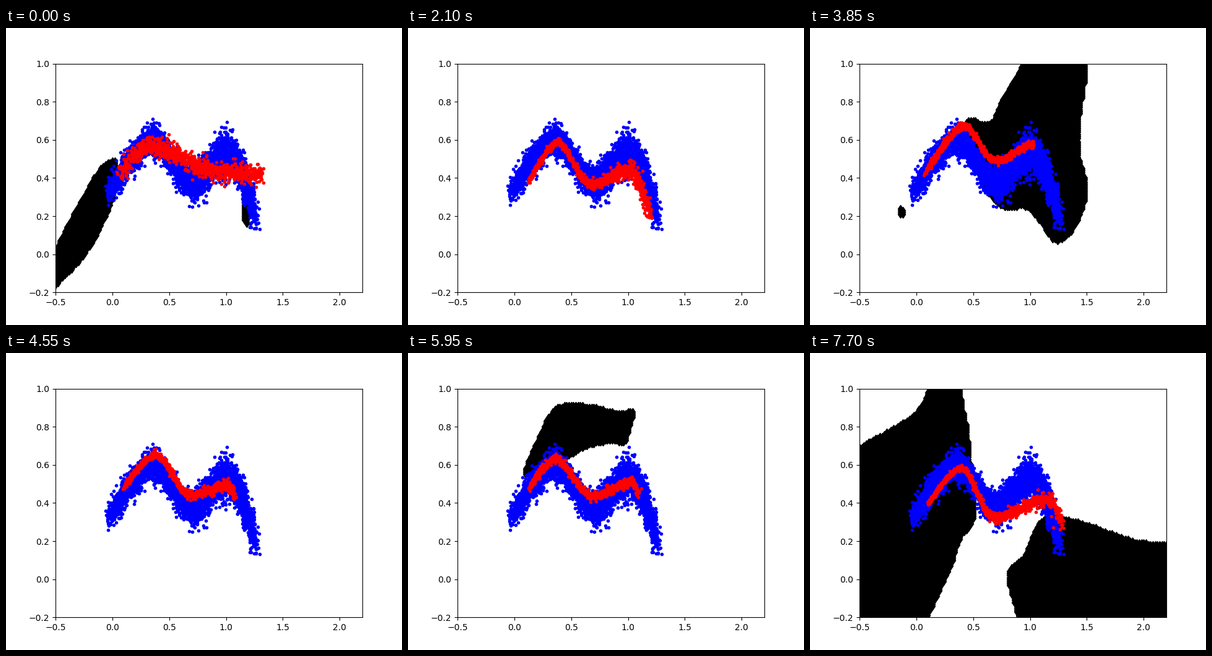
A matplotlib script that plays this animation: 640x480 px, repeating every 8000 ms.

```python
import numpy as np
import matplotlib.pyplot as plt
from matplotlib.animation import FuncAnimation
from matplotlib.path import Path

TICK, HOLD, FRAMES = 50, 7, 160      # each step stays 7 ticks of 50 ms
STEPS = 23
SCALE = np.array([183.7, 308.0])     # pixels per data unit

# Dark decision regions: a few points on each smooth, closed outline
START = [[(-.75, -.3), (-.5, .04), (-.26, .31), (-.1, .46), (.04, .495),
          (.03, .33), (-.08, .155), (-.255, -.02), (-.49, -.165)],
         [(1.14, .35), (1.22, .28), (1.19, .145), (1.14, .2)]]
SLIVER = [[(.44, .57), (.51, .59), (.525, .48), (.52, .39), (.46, .43)]]
DROP = [[(.42, .48), (.52, .385), (.56, .4), (.47, .5)],
        [(1.08, .33), (.97, .197), (.905, .09), (1.0, .03), (1.18, .018),
         (1.35, .09), (1.487, .213), (1.47, .33), (1.32, .377), (1.18, .37)]]
TOWER = [[(.93, 1.02), (1.0, 1.3), (1.45, 1.3), (1.51, 1.02), (1.43, .6),
          (1.505, .34), (1.4, .14), (1.226, .062), (1.07, .174), (.96, .242),
          (.75, .247), (.57, .37), (.43, .62), (.46, .715), (.64, .69),
          (.75, .82)],
         [(-.17, .22), (-.135, .25), (-.1, .22), (-.135, .195)]]
HOOD = [[(-.135, .48), (-.06, .64), (.09, .735), (.2, .82), (.25, .88),
         (.4, .907), (.48, .8), (.465, .62), (.35, .51), (.15, .42),
         (-.04, .34)]]
WALL = [[(.46, 1.02), (.6, 1.3), (1.9, 1.3), (1.78, 1.02), (1.55, .538),
         (1.405, .294), (1.2, .17), (1.0, .262), (.8, .254), (.6, .35),
         (.4, .55), (.295, .73), (.35, .88)]]
SPLIT = [[(-.8, .55), (-.5, .7), (-.17, .81), (.03, .908), (.15, 1.06),
          (.36, 1.06), (.42, .91), (.475, .7), (.515, .33), (.4, .22),
          (.3, .05), (.09, -.22), (-.12, -.5), (-.8, -.5)],
         [(.8, .03), (.94, .13), (1.106, .32), (1.4, .31), (1.9, .209),
          (2.4, .11), (2.5, -.5), (1.0, -.5), (.87, -.18)]]

# Step, region, spread at both ends, and start, crest, dip, crest, end
KEYS = [
    (0, START, (.022, .018),
     [(.06, .42), (.31, .57), (.95, .43), (1.05, .425), (1.32, .42)]),
    (4, SLIVER, (.006, .022),
     [(.14, .41), (.37, .59), (.66, .355), (1.0, .44), (1.22, .21)]),
    (9, DROP, (.006, .02),
     [(.1, .335), (.36, .55), (.69, .345), (1.0, .435), (1.17, .22)]),
    (11, TOWER, (.007, .007),
     [(.07, .42), (.41, .675), (.7, .49), (1.02, .575), (1.03, .575)]),
    (15, HOOD, (.006, .016),
     [(.13, .53), (.33, .595), (.68, .375), (1.02, .415), (1.12, .33)]),
    (19, WALL, (.009, .006),
     [(.12, .45), (.37, .66), (.69, .465), (1.05, .565), (1.06, .565)]),
    (22, SPLIT, (.005, .022),
     [(.1, .395), (.38, .585), (.69, .325), (1.15, .415), (1.29, .29)]),
]
REAL = [(-.04, .32), (.34, .605), (.7, .375), (1.0, .53), (1.26, .19)]


def outline(points, n=6):
    """Closed Catmull-Rom curve with n samples per side."""
    b = np.array(points)
    a, c, d = (np.roll(b, s, axis=0) for s in (1, -1, -2))
    f = np.linspace(0, 1, n, endpoint=False)[:, None, None]
    curve = b + f / 2 * (c - a + f * (2 * a - 5 * b + 4 * c - d
                                      + f * (3 * (b - c) + d - a)))
    return curve.swapaxes(0, 1).reshape(-1, 2)


def hills(turns, x):
    """Rise to a crest, roll through the dip, then fall off."""
    px, py = np.array(turns).T
    i = np.clip(np.searchsorted(px, x) - 1, 0, len(px) - 2)
    f = np.clip((x - px[i]) / (px[i + 1] - px[i]), 0, 1)
    rise = (f + np.sin(np.pi / 2 * f)) / 2
    roll = (1 - np.cos(np.pi * f)) / 2
    fall = 1 - np.cos(np.pi / 2 * f)
    ease = np.where(i == 0, rise, np.where(i == len(px) - 2, fall, roll))
    return py[i] + (py[i + 1] - py[i]) * ease


def depth(points, shape):
    """Signed pixel distance to the outline, positive inside."""
    p, q = points * SCALE, outline(shape) * SCALE
    dist = np.full(len(p), np.inf)
    for a, b in zip(q, np.roll(q, -1, axis=0)):
        e = b - a
        t = np.clip((p - a) @ e / (e @ e), 0, 1)
        dist = np.minimum(dist, np.hypot(*(p - a - t[:, None] * e).T))
    return np.where(Path(q).contains_points(p), dist, -dist)


gx, gy = np.meshgrid(np.arange(-.5, 2.201, .02), np.arange(-.2, 1.001, .01))
grid = np.column_stack([gx.ravel(), gy.ravel()])
fields = [np.max([depth(grid, shape) for shape in key[1]], axis=0)
          for key in KEYS]
key_steps = [key[0] for key in KEYS]


def real_samples(n=5000):
    rng = np.random.default_rng(3)
    x = REAL[0][0] + (REAL[-1][0] - REAL[0][0]) * rng.beta(1.25, 1.15, n)
    spread = .03 + .015 * np.exp(-((x - .95) / .25) ** 2)
    noise = np.clip(rng.standard_t(12, n), -3.7, 3.7)
    return x + rng.normal(0, .018, n), hills(REAL, x) + spread * noise


def state(step, n=1000):
    """Region markers and generated samples at one training step."""
    rng = np.random.default_rng(100 + step)
    i = min(np.searchsorted(key_steps, step, side="right") - 1, len(KEYS) - 2)
    t = (step - key_steps[i]) / (key_steps[i + 1] - key_steps[i])
    swing = np.sin(np.pi * t)

    def mix(a, b):
        return (1 - t) * np.asarray(a) + t * np.asarray(b)

    a, b = rng.uniform(0, 2 * np.pi, 2)
    wave = np.sin(3 * grid[:, 0] + a) * np.cos(4 * grid[:, 1] + b)
    region = grid[mix(fields[i], fields[i + 1]) + 18 * swing * wave > 2]

    spread = mix(KEYS[i][2], KEYS[i + 1][2])
    turns = mix(KEYS[i][3], KEYS[i + 1][3])
    turns[:, 1] += .02 * swing * np.sin(np.arange(5) + a)
    u = rng.uniform(0, 1, n)
    x = turns[0, 0] + (turns[-1, 0] - turns[0, 0]) * u
    sigma = spread[0] + (spread[1] - spread[0]) * u ** 2
    noise = np.clip(rng.standard_t(6, (2, n)), -4, 4) * sigma
    return region, (x + .6 * noise[0], hills(turns, x) + noise[1])


states = [state(k) for k in range(STEPS)]

fig, ax = plt.subplots(figsize=(6.4, 4.8), dpi=100)
ax.set_xlim(-.5, 2.2)
ax.set_ylim(-.2, 1)
dark, = ax.plot([], [], "kd")
ax.plot(*real_samples(), "b.")
red, = ax.plot([], [], "r.")


def update(frame):
    region, fake = states[min(frame // HOLD, STEPS - 1)]
    dark.set_data(*region.T)
    red.set_data(*fake)
    return dark, red


anim = FuncAnimation(fig, update, frames=FRAMES, interval=TICK,
                     repeat=True, repeat_delay=0)
plt.show()
```
